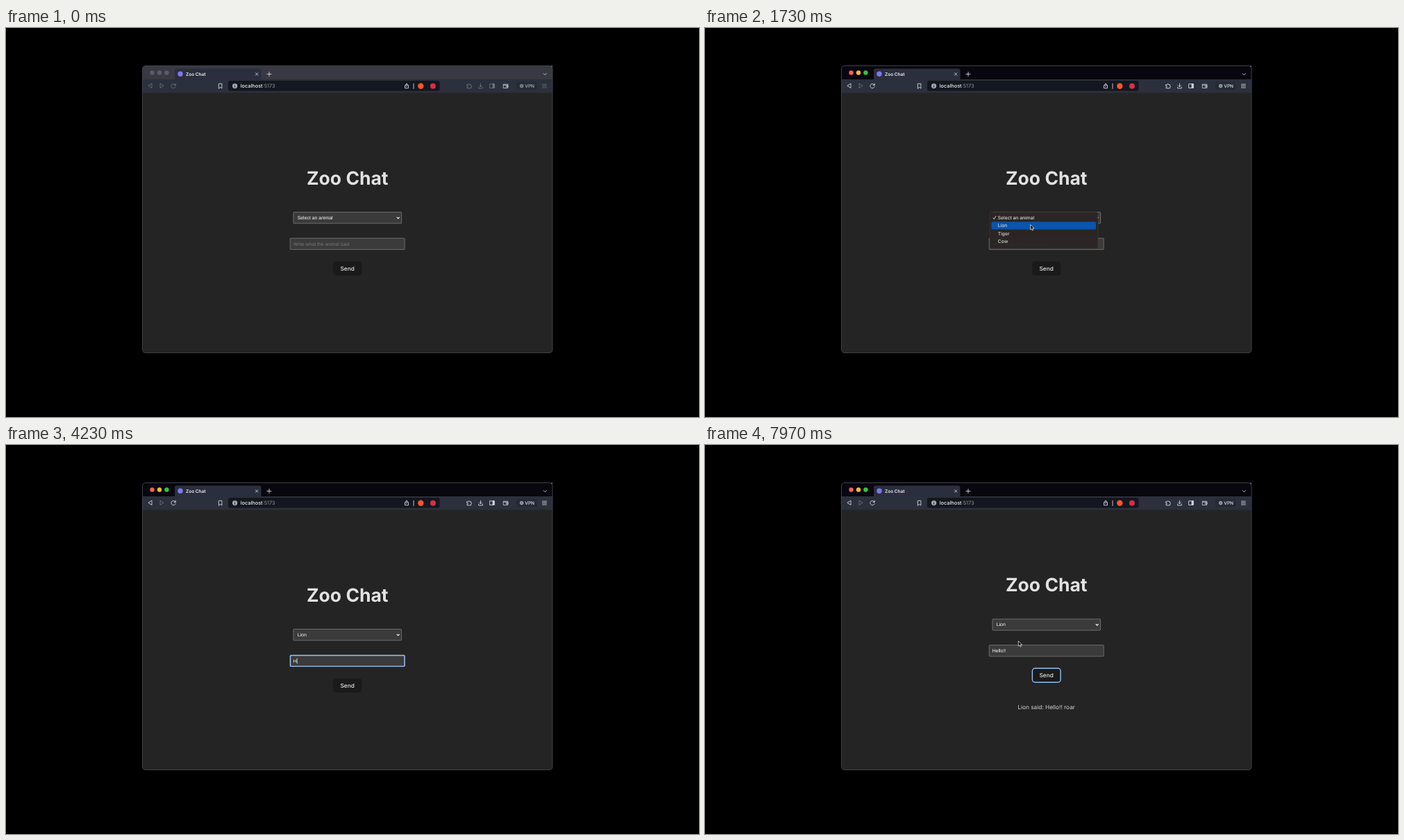
Recreate the animation shown at these times as an HTML page. Size 998 by 561 pixels, loop 8 s.

```html
<!DOCTYPE html>
<html lang="en">
<head>
<meta charset="utf-8">
<title>Zoo Chat</title>
<style>
  html, body { margin: 0; height: 100%; overflow: hidden; background: #000; }
  svg { display: block; width: 100vw; height: 100vh; }
  text { font-family: Inter, sans-serif; text-rendering: geometricPrecision; white-space: pre; }
  .field { font: 6.9px "Liberation Sans", Arial, sans-serif; fill: #fff; }
  .mid { text-anchor: middle; }
  .box { fill: #3b3b3b; stroke: #7c7c7c; stroke-width: .8; }
  .ring { fill: none; stroke: #92bff5; stroke-width: 1.4; }
  .menu { font-size: 6.7px; font-weight: 500; fill: #ddd; }
  .line { fill: none; stroke: #d3d6de; stroke-width: .9; stroke-linecap: round; stroke-linejoin: round; }
  .dim, .idle .fade { opacity: .36; }
  .idle .light { fill: #5c5d63; }
  .idle #strip { fill: #383943; }
  .idle #vpn { opacity: .75; }
</style>
</head>
<body>
<svg viewBox="0 0 998 561">
  <rect width="998" height="561"/>
  <g id="win">
    <clipPath id="round"><rect x="196.5" y="54.5" width="590.5" height="414" rx="4.5"/></clipPath>
    <g clip-path="url(#round)">
      <rect x="196" y="54" width="592" height="415" fill="#242424"/>
      <rect id="strip" x="196" y="54" width="592" height="21" fill="#08060f"/>
      <rect x="196" y="74" width="592" height="19.5" fill="#2b303c"/>
      <path d="M243 74.5V61.5q0-3 3-3h118.500q3 0 3 3v13z" fill="#2b2e3c"/>
    </g>
    <rect x="196.500" y="54.500" width="590.500" height="414" rx="4.500" fill="none" stroke="#46464d" stroke-width=".9"/>
    <rect x="785.500" y="54.500" width="1.200" height="1.200" fill="#ddd"/>

    <circle class="light" cx="210.500" cy="64.500" r="3.200" fill="#ff5f57"/>
    <circle class="light" cx="221" cy="64.500" r="3.200" fill="#febc2e"/>
    <circle class="light" cx="231.400" cy="64.500" r="3.200" fill="#28c840"/>
    <circle cx="251" cy="66.300" r="3.700" fill="#7d78f2"/>
    <text x="259" y="68.700" font-size="6.500" font-weight="600" fill="#f0f0f4">Zoo Chat</text>
    <path class="line" d="M359.500 64.800l3.400 3.400m0-3.400l-3.400 3.400M376 66.500h6m-3-3v6M774.200 65.600l2.100 2.100 2.100-2.100"/>

    <rect x="320" y="76" width="304.500" height="14.800" rx="3" fill="#14171f"/>
    <path class="line fade" d="M210 80.500v6l-4.800-3zM244 82.200a3.200 3.200 0 1 0 .2 2.300M244.300 80.300v2.200h-2.200"/>
    <path class="line dim" d="M222 80.500v6l4.800-3z"/>
    <path class="line" d="M306.700 80.300h4.200v6.800l-2.100-1.700-2.100 1.700z"/>
    <circle cx="329.600" cy="83.600" r="3.600" fill="#a3a7b0"/>
    <path d="M329.600 81.500v.8m0 1v2.400" stroke="#14171f"/>
    <text x="337.700" y="86.200" font-size="7.350" font-weight="500" fill="#eceef2">localhost<tspan font-weight="400" fill="#9498a1">:5173</tspan></text>
    <path class="line" d="M575.600 82.600h-1.100v4.200h5v-4.200h-1.100M577 84.500v-4.300m-1.400 1.300l1.400-1.400 1.400 1.400M587 80.300v7.200" stroke-width=".8"/>
    <circle cx="597.300" cy="83.700" r="4.200" fill="#fb542b"/>
    <circle cx="614.900" cy="83.700" r="4" fill="#d52f45"/>
    <g class="line">
      <path class="fade" d="M664 81.700h1.700a1 1 0 1 1 2 0h1.800v1.700a1 1 0 1 1 0 2v1.500h-5.500v-1.600a1 1 0 1 0 0-1.900z"/>
      <path class="fade" d="M683.500 80.200v4.500m-1.900-1.800l1.900 1.900 1.900-1.900M680.700 85.200v1.800h5.600v-1.800"/>
      <path class="fade" d="M697 80.700h6.300v5.800H697z"/>
      <path class="fade" d="M701 81v5.200h2V81z" fill="#d3d6de"/>
      <path d="M716.600 81.200h6v5.400h-6zM716.600 82.300h6.400M720.600 83.700h2.600v1.400h-2.600z" opacity=".85"/>
      <path class="fade" d="M772.400 81.200h6m-6 2.400h6m-6 2.400h6"/>
    </g>
    <g id="vpn">
      <rect x="735" y="77.500" width="30" height="12" rx="3" fill="#252a35"/>
      <circle cx="742.600" cy="83.600" r="2.300" fill="#777c87" stroke="#c4c7cf" stroke-width=".8"/>
      <text x="747.300" y="86" font-size="6.500" font-weight="500" fill="#e4e6ea">VPN</text>
    </g>
  </g>

  <g id="page">
    <text class="mid" x="491.800" y="226" font-size="26.500" font-weight="700" fill="#e2e2e2">Zoo Chat</text>
    <rect class="box" x="414" y="265.600" width="155.600" height="16.200" rx=".8"/>
    <text id="choice" class="field" x="419.700" y="276"></text>
    <path d="M562.800 272.800l1.900 1.900 1.900-1.900" fill="none" stroke="#fff" stroke-width="1.200"/>
    <rect class="box" x="409.200" y="303.200" width="165" height="16.200" rx=".8"/>
    <rect id="inputRing" class="ring" x="409.500" y="303.500" width="164.500" height="15.600" rx="1"/>
    <text id="hint" class="field" x="413.700" y="313.800" style="fill:#777">Write what the animal said</text>
    <text id="typed" class="field" x="413.700" y="313.800"></text>
    <rect id="caret" y="307.400" width=".7" height="8" fill="#fff"/>
    <rect x="471" y="336.500" width="41.300" height="20.600" rx="4.200" fill="#1a1a1a"/>
    <rect id="hover" x="471.300" y="336.500" width="40.800" height="20.500" rx="4.200" fill="none" stroke="#5a5fe0" stroke-width=".9"/>
    <rect id="sendRing" class="ring" x="471.400" y="336.600" width="40.700" height="20.300" rx="4"/>
    <text class="mid" x="491.600" y="350.100" font-size="8.300" font-weight="500" fill="#e6e6e6">Send</text>
    <text id="reply" class="mid" x="491.600" y="395.500" font-size="8.300" fill="#d4d4d4">Lion said: Hello!! roar</text>
  </g>

  <g id="menu">
    <rect x="410" y="265.200" width="156" height="53" rx="3" fill="#2b2625" fill-opacity=".96" stroke="#45403e" stroke-width=".5"/>
    <rect id="pick" x="412.500" width="150.500" height="11.200" rx="2" fill="#0a55ad"/>
    <path d="M414.800 273.600l1.500 2 2.700-4.600" fill="none" stroke="#ddd" stroke-width=".9"/>
    <g class="menu">
      <text x="421.800" y="275.900">Select an animal</text>
      <text x="421.800" y="287.300">Lion</text>
      <text x="421.800" y="298.700">Tiger</text>
      <text x="421.800" y="310.100">Cow</text>
    </g>
  </g>

  <g id="cursor">
    <path id="arrow" d="M0 0v7.200l1.700-1.500 1.100 2.600 1.300-.6-1.100-2.500h2.300z" fill="#000" stroke="#fff" stroke-width=".7"/>
    <g id="beam" fill="none">
      <path d="M-1.800-4.500q1.800 0 1.800 1.200v6.600q0 1.200-1.800 1.200M1.800-4.500q-1.800 0-1.800 1.200M0 3.300q0 1.200 1.800 1.200M-1 1.500h2" stroke="#fff" stroke-width="1.500"/>
      <path d="M-1.800-4.500q1.800 0 1.800 1.200v6.600q0 1.200-1.800 1.200M1.800-4.500q-1.800 0-1.800 1.200M0 3.300q0 1.200 1.800 1.200M-1 1.500h2" stroke="#111" stroke-width=".7"/>
    </g>
    <path id="hand" d="M-.7.300q.7-.9 1.400 0v2.200l2.600.6q.9.300.7 1.300L3.500 7H-.5L-2.400 4.300q0-1 .9-.6l.8.600z" fill="#fff" stroke="#111" stroke-width=".6"/>
  </g>
</svg>
<script>
const $ = id => document.getElementById(id);
const show = (id, on) => $(id).style.display = on ? "" : "none";
const LOOP = 8000, ACTIVE = 800, OPEN = 1250, CHOSEN = 2440, FOCUS = 2690, SENT = 7720;
const keys = [4190, 4500, 4770, 5870, 6030, 6530, 6670];
const word = "Hello!!";
// time, x, y
const path = [
  [30, 520, 440], [700, 484, 277], [1000, 482.500, 273], [1300, 482, 273],
  [2000, 462, 289], [2230, 461.500, 289.500], [2450, 460, 288],
  [2670, 430.500, 308.500], [7070, 430.500, 308.500], [7400, 489.200, 347.300],
  [7760, 489.200, 347.300], [7970, 451.300, 282.800]
];

function pointer(t) {
  const i = path.findIndex(p => p[0] > t);
  if (i < 0) return path[path.length - 1].slice(1);
  if (i === 0) return path[0].slice(1);
  const [a, b] = [path[i - 1], path[i]];
  const u = (t - a[0]) / (b[0] - a[0]), e = u * u * (3 - 2 * u);
  return [a[1] + (b[1] - a[1]) * e, a[2] + (b[2] - a[2]) * e];
}

const inside = (x, y, l, top, r, b) => x > l && x < r && y > top && y < b;

function draw(t) {
  const sent = t >= SENT, shift = sent ? -14.600 : 0;
  const open = t >= OPEN && t < CHOSEN;
  const [x, y] = pointer(t);

  $("win").setAttribute("class", t < ACTIVE ? "idle" : "");
  $("page").setAttribute("transform", `translate(0 ${shift})`);
  $("choice").textContent = t < CHOSEN ? "Select an animal" : "Lion";
  show("menu", open);
  const row = Math.max(0, Math.min(3, Math.floor((y - 268) / 11.400)));
  $("pick").setAttribute("y", 268 + row * 11.400);

  const count = keys.filter(k => t >= k).length;
  $("typed").textContent = word.slice(0, count);
  show("hint", !count);
  const focused = t >= FOCUS && !sent;
  show("inputRing", focused);
  // the caret restarts its blink at each key
  const since = t - (count ? keys[count - 1] : FOCUS);
  show("caret", focused && since % 1000 < 500);
  $("caret").setAttribute("x", 413.800 + (count ? $("typed").getComputedTextLength() : 0));

  const overInput = !open && inside(x, y - shift, 409, 303, 574, 320);
  const overSend = inside(x, y - shift, 471, 336, 512.500, 357);
  show("hover", overSend && !sent);
  show("sendRing", sent);
  show("reply", sent);

  show("cursor", t >= 30 && !(t >= keys[0] && t < 7070));
  $("cursor").setAttribute("transform", `translate(${x} ${y})`);
  show("beam", overInput);
  show("hand", overSend);
  show("arrow", !overInput && !overSend);
}

const start = performance.now();
function tick() {
  draw((performance.now() - start) % LOOP);
  requestAnimationFrame(tick);
}
tick();
</script>
</body>
</html>
```
